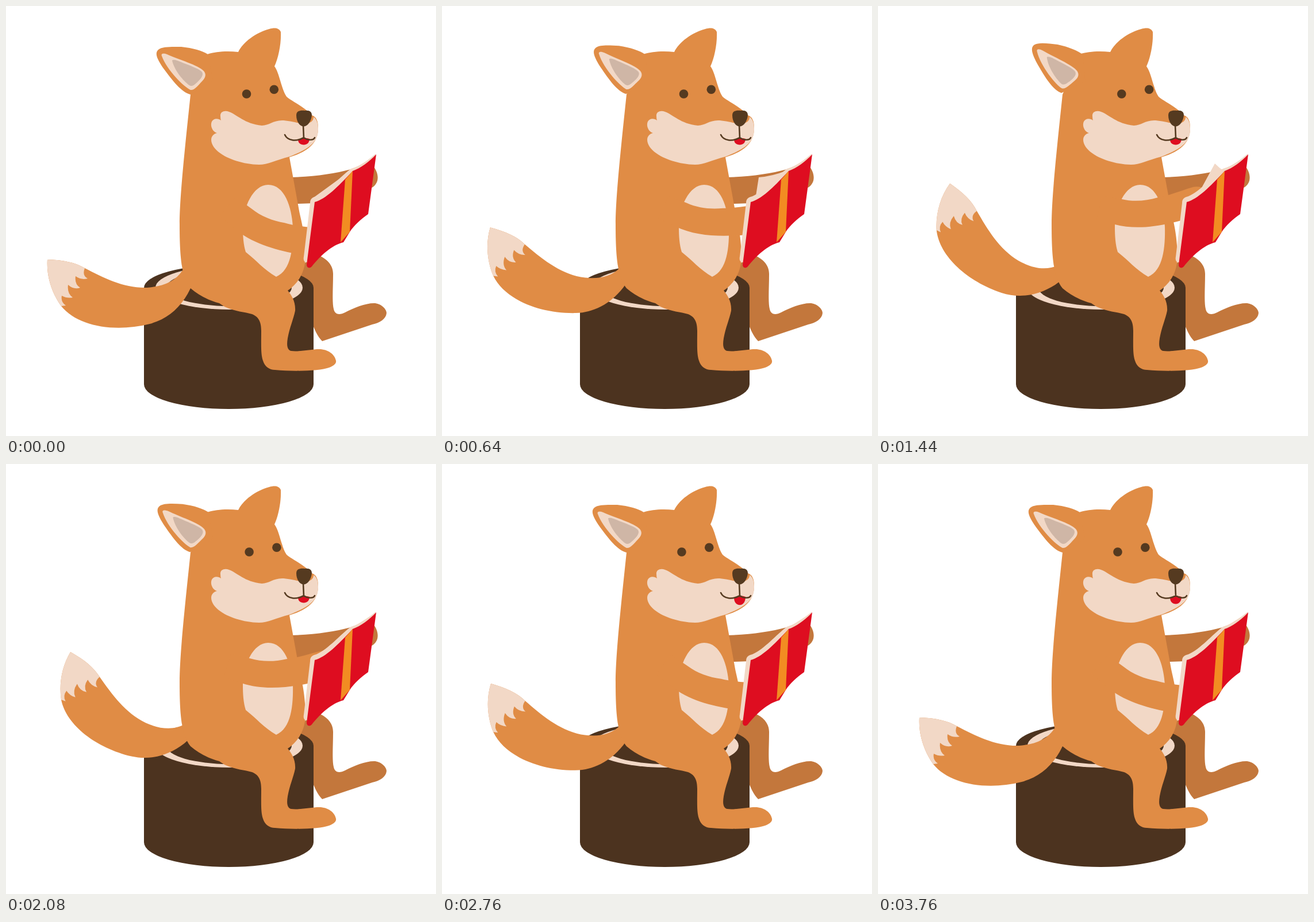
Write an HTML page that moves like this. It is 748 px wide and 748 px high and loops after 3800 ms.

```html
<!DOCTYPE html>
<html lang="en">
<head>
<meta charset="utf-8">
<title>Reading fox</title>
<style>
  html, body { margin: 0; width: 100%; height: 100%; overflow: hidden; background: #fff; }
  svg { display: block; width: 100%; height: 100%; }
  .fur { fill: #e08c45; }
  .shade { fill: #c3773c; }
  .cream { fill: #f2d8c6; }
  .wood { fill: #4c331f; }
  .dark { fill: #553a20; }
  .red { fill: #de0d20; }
  .line { fill: none; stroke: #553a20; stroke-width: 2.6; stroke-linecap: round; }
</style>
</head>
<body>
<svg viewBox="0 0 748 748">
  <g class="shade">
    <path d="M495 298C535 297 570 292 600 284L640 280C645 287 648 295 646 304C643 313 636 318 628 318L560 340C540 343 525 344 495 344Z"/>
    <path d="M500 470L535 430C558 438 569 450 569 466C569 490 567 515 570 527C572 537 580 538 590 533C605 525 625 517 640 517C652 517 662 527 662 534C661 545 650 551 637 554L550 583C542 575 536 562 532 550Z"/>
  </g>

  <path class="wood" d="M240 490A147.5 40 0 0 1 535 490V658A147.5 43 0 0 1 240 658Z"/>
  <ellipse class="cream" cx="388" cy="490" rx="128" ry="38"/>
  <ellipse class="wood" cx="388" cy="490" rx="109" ry="32"/>

  <g id="tail">
    <path class="fur" d="M72 441C100 442 120 446 137 456C170 473 205 491 245 490C275 488 295 478 307 460L335 455L321 491C305 525 280 545 250 553C190 568 125 558 96 522C80 500 70 470 72 441Z"/>
    <path class="cream" d="M72 441C100 442 120 446 137 456Q132 469 142 474Q131 477 121 470Q119 484 129 490Q118 494 108 485Q106 500 116 507Q106 509 97 504Q95 515 104 521L96 522C80 500 70 470 72 441Z"/>
  </g>

  <path class="fur" d="M321 154C312 240 302 330 302 380C302 420 304 440 306 452C308 465 312 480 321 491C335 503 352 512 371 517L380 523C400 532 415 532 428 536C441 541 444 552 444 565C444 590 443 605 447 617C450 627 458 633 468 633C500 636 545 635 562 629C570 626 575 622 574 617C572 606 560 597 545 597C530 597 510 602 496 600C489 598 488 590 490 578C493 560 500 545 503 530C504 515 497 503 490 495C510 482 521 460 521 435C520 390 512 370 509 351L493 263C530 252 543 235 543 212C543 200 540 193 532 190L521 180C505 168 488 160 487 156C478 140 475 115 467 105C474 90 479 65 478 45C474 37 466 38 458 40C435 46 412 63 404 80C385 78 365 79 350 84Z"/>

  <g id="ear">
    <path class="fur" d="M321 154C305 150 290 130 275 110C263 93 258 82 265 76C272 70 290 71 305 71C325 73 342 78 351 84L360 130Z"/>
    <path class="cream" d="M271 87C269 82 275 82 280 84C300 93 335 103 344 113C349 119 347 125 341 131C334 138 328 147 321 146C310 141 280 112 271 87Z"/>
    <path fill="#cfb6a6" d="M289 95C290 93 294 94 298 95C315 102 337 109 341 115C345 121 336 130 330 135C326 139 322 140 319 138C308 130 293 112 289 95Z"/>
  </g>

  <path class="cream" d="M373 192C372 184 380 181 388 184C402 189 415 205 445 208C457 208 465 199 480 199C490 199 505 203 517 205C535 205 535 195 535 193C541 197 543 205 543 214C543 235 530 248 493 262C470 268 455 276 440 276C400 275 358 256 357 233C357 226 362 222 367 221C358 218 355 207 358 201C361 195 369 195 374 199Q373 196 373 192Z"/>
  <path id="tongue" class="red" d="M508 232Q518 228 528 231C528 238 523 241.500 518 241.500C512 241.500 508 238 508 232Z"/>
  <path class="line" d="M517 207L518 230M485 224C490 235 505 236 518 229C525 234 535 234 537 229"/>
  <path class="dark" d="M505 190C505 182 513 181 520 182C528 181 532 184 532 190C531 200 525 209.500 518 209.500C510 209 505 200 505 190Z"/>
  <g id="eyes" class="dark">
    <circle cx="418.500" cy="153" r="7.800"/>
    <circle cx="466.300" cy="145.300" r="7.800"/>
  </g>

  <path class="cream" d="M470 471C450 460 435 442 417 428C413 415 412 400 412 385C412 350 430 311 456 311C485 311 497 350 499 384C500 420 496 460 470 471Z"/>
  <path id="page" class="cream"/>
  <path id="arm" class="fur" d="M390 330L424 336C445 341 467 339 487 333C510 329 530 320 548 315C560 312 575 318 580 330L560 365L528 373C490 383 450 390 412 380L380 372Z"/>

  <path class="cream" d="M524 446C518 446 517 441 518 436L529 343C529 335 533 333 540 331C562 321 580 298 600 283C617 278 630 268 643 257L630 300L540 400Z"/>
  <path class="red" d="M537 341C556 336 577 315 603 287C617 282 632 271 644 258L630 362C618 370 605 382 598 393L587 411C567 416 548 433 532 453C529 457 523 456 523 450Z"/>
  <path fill="#f28c22" d="M590 302L603 287L598 393L582 411Z"/>
</svg>
<script>
const LOOP = 3800, STEP = 40;
const part = id => document.getElementById(id);
const linear = x => x;
const sine = x => (1 - Math.cos(Math.PI * x)) / 2;

// Value at time t on a track of [time, value] keys
function track(t, keys, ease = sine) {
  const next = keys.findIndex(k => k[0] > t);
  if (next === 0) return keys[0][1];
  if (next < 0) return keys[keys.length - 1][1];
  const [t0, a] = keys[next - 1], [t1, b] = keys[next];
  return a + (b - a) * ease((t - t0) / (t1 - t0));
}

const move = (id, transform) => part(id).setAttribute('transform', transform);
const turn = (id, angle, x, y) => move(id, `rotate(${angle} ${x} ${y})`);

function turnPage(t) {
  const along = (a, b, c, d) => track(t, [[200, a], [640, b], [1440, c], [1980, d]], linear);
  const x = along(534, 551, 586, 641), y = along(334, 298, 274, 260);
  const dx = along(-1, -5, -24, -10), dy = along(20, 32, 44, 30);
  const bend = along(0, 4, 1, 0);
  part('page').setAttribute('d',
    `M${x} ${y}Q${(x + 600) / 2} ${(y + 286) / 2 + bend} 600 286L596 330L${x + dx} ${y + dy}Z`);
}

function draw(now) {
  const t = Math.floor(now % LOOP / STEP) * STEP;
  turn('tail', track(t, [[0, 0], [1480, 32.6], [3800, 0]]), 325, 466);
  turn('ear', track(t, [[0, 0], [1480, 6.3], [2440, 0]]), 345, 135);
  turn('arm', track(t, [[0, 26], [1160, 0], [1790, 0], [2980, 26]]), 390, 350);
  const look = track(t, [[0, 0], [640, 2], [1440, 5.3], [1760, 5.6], [2080, 4.6],
    [2440, -2.6], [3120, -0.4], [3760, -1.5]], linear);
  move('eyes', `translate(${look})`);
  const tongue = track(t, [[2080, 1], [2440, 1.25], [3120, 1.5], [3800, 1.18]]);
  move('tongue', `translate(0 231) scale(1 ${tongue}) translate(0 -231)`);
  turnPage(t);
}

const start = performance.now();
function tick() {
  draw(performance.now() - start);
  requestAnimationFrame(tick);
}
tick();
</script>
</body>
</html>
```
